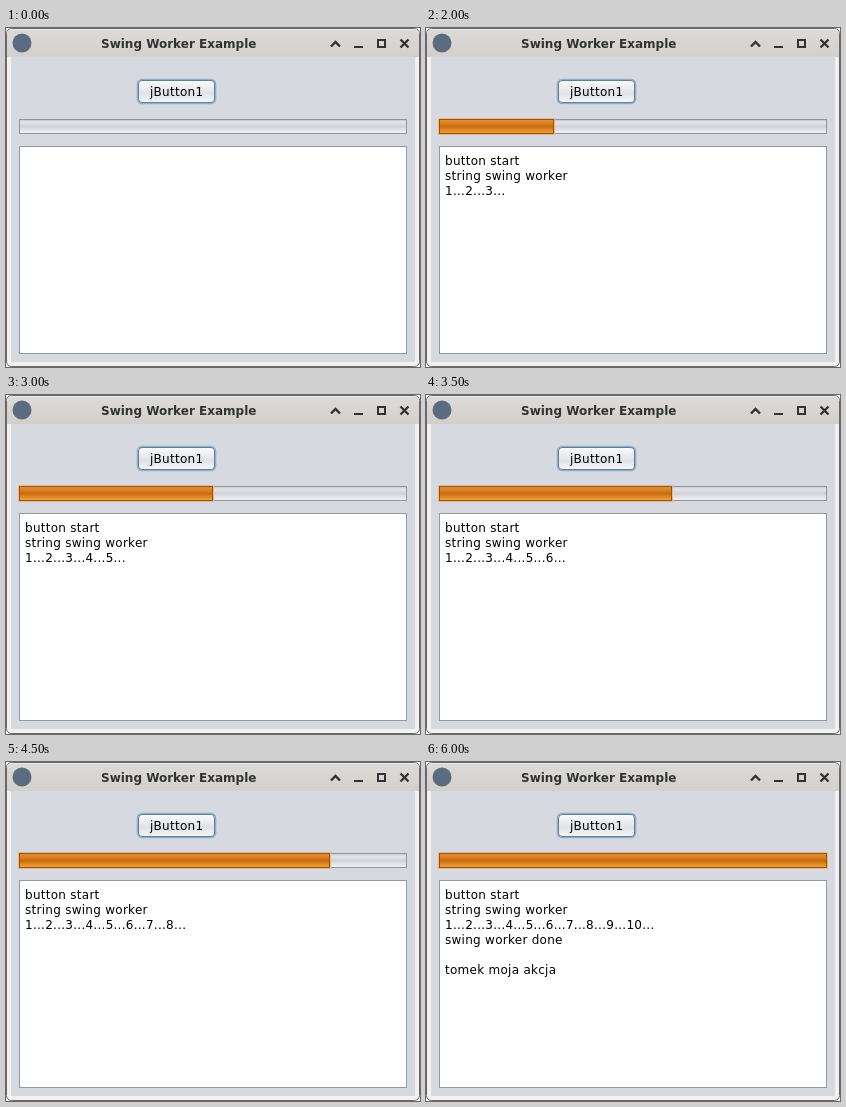
An HTML page for the animation above (6.5 s loop, 414 px wide and 339 px high).

```html
<!DOCTYPE html>
<html lang="en">
<head>
<meta charset="utf-8">
<title>Swing Worker Example</title>
<style>
  html, body { margin: 0; width: 100%; height: 100%; overflow: hidden; background: #fff; }
  svg { display: block; width: 414px; height: 339px; }
  text { font: 12px "DejaVu Sans", sans-serif; fill: #000; white-space: pre; }
  .title { font-weight: bold; fill: #2e3436; }
</style>
</head>
<body>
<svg viewBox="0 0 414 339" xmlns="http://www.w3.org/2000/svg">
  <defs>
    <linearGradient id="head" x2="0" y2="1">
      <stop offset="0" stop-color="#dedad7"/>
      <stop offset="1" stop-color="#d3cfcb"/>
    </linearGradient>
    <linearGradient id="face" x2="0" y2="1">
      <stop offset="0" stop-color="#fbfbfc"/>
      <stop offset=".45" stop-color="#e6e8ec"/>
      <stop offset=".6" stop-color="#dfe2e7"/>
      <stop offset="1" stop-color="#f6f8fa"/>
    </linearGradient>
    <linearGradient id="track" x2="0" y2="1">
      <stop offset="0" stop-color="#c3c6cb"/>
      <stop offset=".2" stop-color="#e2e4e8"/>
      <stop offset=".5" stop-color="#d0d3d8"/>
      <stop offset="1" stop-color="#f3f4f6"/>
    </linearGradient>
    <linearGradient id="orange" x2="0" y2="1">
      <stop offset="0" stop-color="#dd9040"/>
      <stop offset=".25" stop-color="#d98328"/>
      <stop offset=".5" stop-color="#c96c0c"/>
      <stop offset="1" stop-color="#f0a644"/>
    </linearGradient>
  </defs>

  <!-- window frame -->
  <rect x=".5" y=".5" width="413" height="338" rx="5" fill="#f2f1f0" stroke="#6b6967"/>
  <path d="M1 29V6Q1 1 6 1H408Q413 1 413 6V29Z" fill="url(#head)"/>
  <path d="M5 1.5H409" stroke="#edebe9"/>
  <rect x="5" y="29" width="404" height="305" fill="#d6d9df"/>
  <circle cx="16" cy="15" r="9.5" fill="#5b6c80"/>
  <text class="title" x="95" y="20">Swing Worker Example</text>
  <g fill="none" stroke="#2e3436" stroke-width="2">
    <path d="M325 18.5L329.5 14L334 18.5" stroke-width="2.4"/>
    <path d="M348 19H357"/>
    <rect x="372" y="12" width="7" height="7"/>
    <path d="M394.5 11.5L402.5 19.5M402.5 11.5L394.5 19.5" stroke-width="2.3"/>
  </g>

  <!-- button with focus ring -->
  <rect x="131.5" y="51.5" width="78" height="24" rx="4.5" fill="none" stroke="#8fb0cc" stroke-width="1.6"/>
  <rect x="132.5" y="52.5" width="76" height="22" rx="3.5" fill="url(#face)" stroke="#617f9b"/>
  <text class="ui" x="144" y="68">jButton1</text>

  <!-- progress bar -->
  <rect x="13.5" y="91.5" width="387" height="14" fill="url(#track)" stroke="#90959d"/>
  <g id="fill">
    <rect id="glow" x="12.5" y="90.5" height="16" fill="none" stroke="#e5b98c"/>
    <rect id="bar" x="13.5" y="91.5" height="14" fill="url(#orange)" stroke="#9c5008"/>
  </g>

  <!-- text area -->
  <rect x="13.5" y="118.5" width="387" height="207" fill="#fff" stroke="#9199a5"/>
  <g id="log"></g>
</svg>
<script>
const LOOP = 6500, STEP = 500;
const $ = id => document.getElementById(id);
const lines = Array.from({ length: 6 }, (_, i) => {
  const t = document.createElementNS("http://www.w3.org/2000/svg", "text");
  t.setAttribute("class", "ui");
  t.setAttribute("x", 19);
  t.setAttribute("y", 137 + 15 * i);
  return $("log").appendChild(t);
});

// Widen spacing slightly when glyph advances are not rounded to whole pixels.
lines[0].textContent = "0";
const gap = Math.max(0, 8 - lines[0].getComputedTextLength()) * 0.75;
document.querySelectorAll(".ui").forEach(t => t.style.letterSpacing = gap + "px");

function report(step) {
  if (step < 1) return [];
  const count = Math.min(step - 1, 10);
  const out = ["button start", "string swing worker", ""];
  for (let i = 1; i <= count; i++) out[2] += i + "...";
  if (step > 11) out.push("swing worker done", "", "tomek moja akcja");
  return out;
}

let shown = -1;
function draw(ms) {
  const step = Math.floor(ms % LOOP / STEP);
  if (step === shown) return;
  shown = step;
  const count = Math.max(0, Math.min(step - 1, 10));
  const right = Math.round(11 + 39.1 * count) - 0.5;
  $("fill").style.display = count ? "" : "none";
  if (count) {
    $("bar").setAttribute("width", Math.min(right, 400.5) - 13.5);
    $("glow").setAttribute("width", Math.min(right + 1, 401.5) - 12.5);
  }
  const text = report(step);
  lines.forEach((t, i) => t.textContent = text[i] || "");
}

const start = performance.now();
function tick() {
  draw(performance.now() - start);
  requestAnimationFrame(tick);
}
tick();
</script>
</body>
</html>
```
